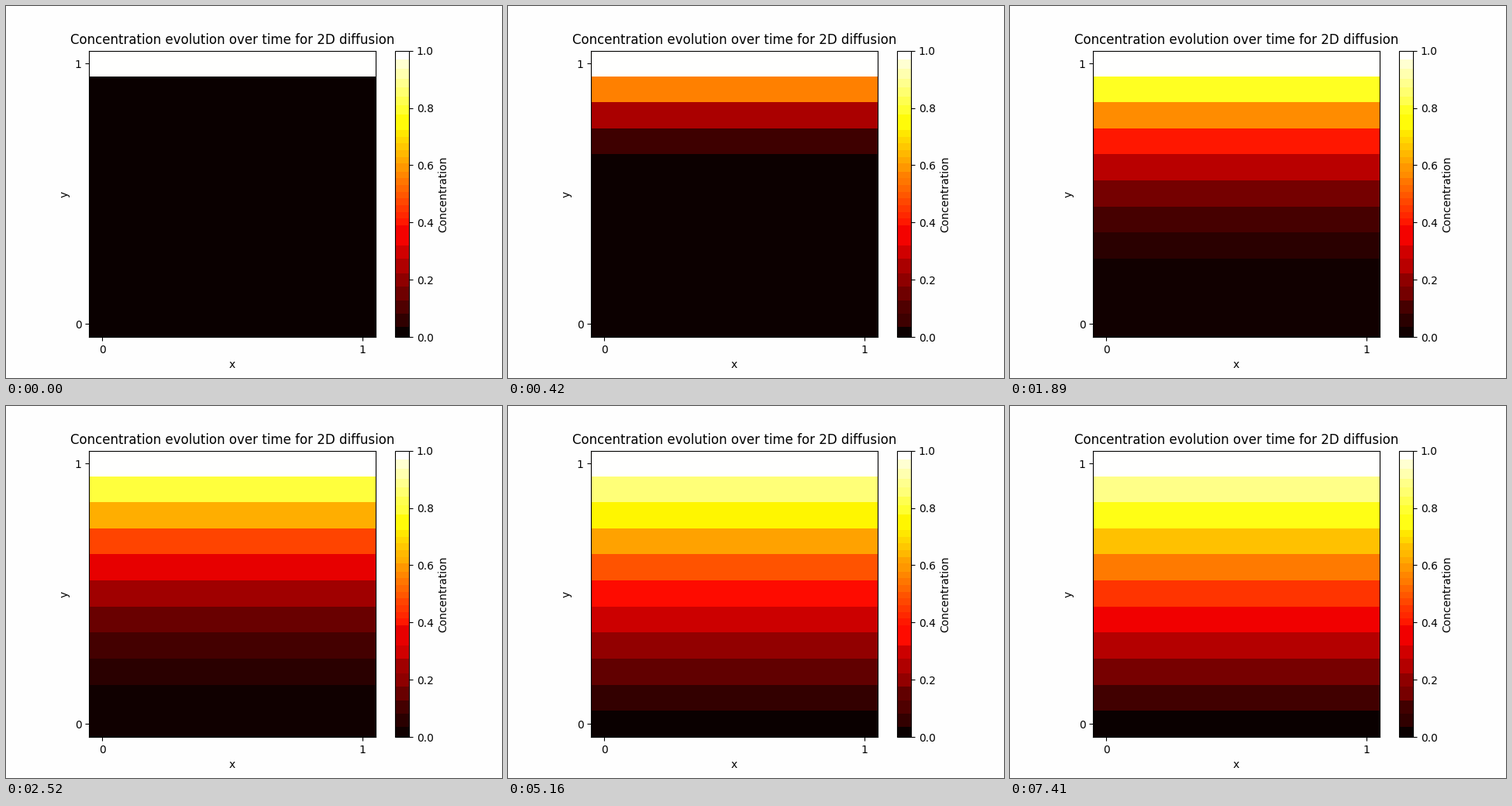
Recreate the animation shown at these times as a matplotlib script. Size 640 by 480 pixels, loop 8000 ms.

```python
import numpy as np
import matplotlib.pyplot as plt
from matplotlib.animation import FuncAnimation
from matplotlib.cm import ScalarMappable
from matplotlib.colors import ListedColormap, Normalize

LOOP_MS = 8000
INTERVAL = 20
STEP_MS = 30          # one diffusion step
N = 11                # rows of the grid
RATE = 0.1            # D * dt / dx**2

# Pixel areas used to weight the colour bands
ROW_AREA = 370 * 33.6 // 1
BAR_AREA = 26
PAGE_AREA = 160000

HOT = plt.get_cmap("hot")(np.arange(256), bytes=True)[:, :3].astype(int)
# Colours share a band when their top bits agree (3 red, 4 green, 3 blue)
KEYS = (HOT[:, 0] >> 5) << 7 | (HOT[:, 1] >> 4) << 3 | HOT[:, 2] >> 5
BANDS = np.unique(KEYS, return_inverse=True)[1]


def diffuse(steps):
    """Concentration per row, top first, after each step."""
    c = np.zeros(N)
    c[0] = 1
    history = [c]
    for _ in range(steps):
        c = c.copy()
        c[1:-1] += RATE * (c[2:] - 2 * c[1:-1] + c[:-2])
        history.append(c)
    return history


def banded(levels):
    """Colour table where each band holds its area-weighted mean colour."""
    area = BAR_AREA + ROW_AREA * np.bincount(levels, minlength=256)
    area[-1] += PAGE_AREA
    total = np.bincount(BANDS, area)
    means = [np.bincount(BANDS, area * HOT[:, ch]) // total for ch in range(3)]
    return np.stack(means, axis=1)[BANDS].astype(np.uint8)


history = diffuse(LOOP_MS // STEP_MS + 1)
page = (254 / 255,) * 3

fig, ax = plt.subplots(figsize=(6.4, 4.8), dpi=100, facecolor=page)
image = ax.imshow(np.zeros((N, N, 3), np.uint8), interpolation="nearest",
                  extent=(-0.05, 1.05, -0.05, 1.05))
ax.set(xticks=[0, 1], yticks=[0, 1], xlabel="x", ylabel="y",
       title="Concentration evolution over time for 2D diffusion")
bar = fig.colorbar(ScalarMappable(Normalize(0, 1), "hot"), ax=ax,
                   label="Concentration")


def update(i):
    step = (i * INTERVAL + INTERVAL // 2) // STEP_MS
    levels = np.minimum((history[step] * 256).astype(int), 255)
    table = banded(levels)
    image.set_data(np.repeat(table[levels][:, None], N, axis=1))
    bar.solids.set_cmap(ListedColormap(table / 255))
    return image, bar.solids


anim = FuncAnimation(fig, update, frames=LOOP_MS // INTERVAL,
                     interval=INTERVAL, repeat=True, repeat_delay=0)
plt.show()
```
